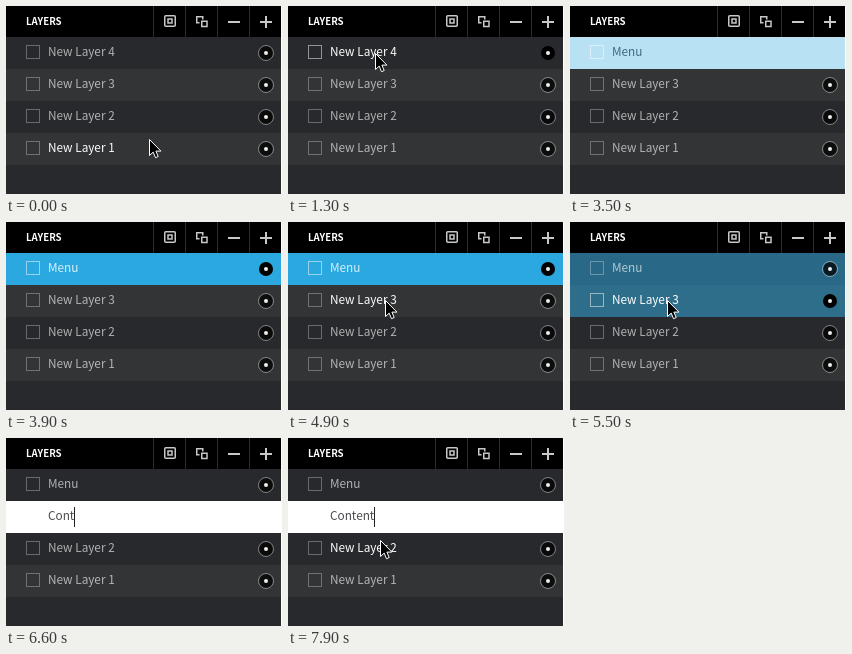
Recreate the animation shown at these times as an HTML page. Size 276 by 188 pixels, loop 8 s.

```html
<!DOCTYPE html>
<html lang="en">
<head>
<meta charset="utf-8">
<title>Layers panel</title>
<style>
  html, body { margin: 0; width: 100%; height: 100%; overflow: hidden; background: #28292d; }
  svg { display: block; width: 276px; height: 188px; }
  text { font: 11.8px "Noto Sans CJK JP", "Noto Sans CJK SC", "Noto Sans CJK", "Noto Sans", sans-serif; white-space: pre; }
  .title { font-size: 9.7px; font-weight: 700; fill: #fff; }
  .icons { fill: none; stroke: #c8c8c8; stroke-width: 1.5; }
</style>
</head>
<body>
<svg viewBox="0 0 276 188">
  <rect width="276" height="188" fill="#28292d"/>
  <g id="rows"></g>
  <rect width="276" height="31"/>
  <path d="M147.5 0V31M179.5 0V31M211.5 0V31M243.5 0V31" stroke="#2b2c2f"/>
  <text class="title" x="20" y="19">LAYERS</text>
  <g class="icons">
    <rect x="158.75" y="9.75" width="10.5" height="10.5" rx="1"/>
    <rect x="162" y="13" width="4" height="4"/>
    <path d="M193.5 16.75H190.75V10.75H196.75V13.5"/>
    <rect x="195.75" y="15.25" width="5.25" height="5.25"/>
    <path d="M222 16H234M254 16H266M260 10V22" stroke-width="2"/>
  </g>
  <rect x="275" width="1" height="188" fill="#fff"/>
  <g id="cursor">
    <path id="arrow" d="M0 0V16L3.7 12.6L6 18.2L8.7 17L6.4 11.6H11.4Z" stroke="#fff"/>
    <path id="hand" d="M-1.6 1Q0 -1 1.5 1V6Q3 4.8 4 6.3Q5.6 5.3 6.5 7Q8.6 6.4 8.6 8.5V11Q8.4 13 7 15.5H-.5Q-1.5 13 -4 9.6Q-4.6 7.2 -1.6 9Z" transform="translate(2 4)" fill="#fff" stroke="#000"/>
  </g>
</svg>
<script>
const LOOP = 8000, TICK = 100, BLINK = 500;
const TOP = 31, ROW = 32, LEFT = 42;
const NS = 'http://www.w3.org/2000/svg';
const $ = id => document.getElementById(id);

function set(node, attrs) {
  for (const key in attrs) node.setAttribute(key, attrs[key]);
}
function add(parent, tag, attrs = {}) {
  const node = document.createElementNS(NS, tag);
  set(node, attrs);
  return parent.appendChild(node);
}
const show = (node, on) => { node.style.display = on ? '' : 'none'; };
const ramp = (time, start, end) => Math.min(1, Math.max(0, (time - start) / (end - start)));
const ease = p => p * p * (3 - 2 * p);
const never = [Infinity, Infinity];

// Fades are [start, end] times; press and typing are moments.
const layers = [
  {
    name: 'New Layer 4', word: 'Menu', press: 1300, release: 5500, typing: 2300,
    select: [1300, 1400], deselect: [5400, 5600], open: [1500, 1800], close: [3400, 3700]
  },
  {
    name: 'New Layer 3', word: 'Content', press: 5500, release: LOOP, typing: 6200,
    select: [5400, 5600], deselect: never, open: [5600, 5900], close: never
  },
  { name: 'New Layer 2' },
  { name: 'New Layer 1' }
];

const glides = [
  { start: 0, end: 600, hide: 2200, from: [143, 133], to: [87, 47] },
  { start: 4500, end: 4900, hide: 6100, from: [87, 48], to: [97, 78] },
  { start: 7700, end: 7900, hide: LOOP, from: [97, 83], to: [92, 102] }
];

function pointerAt(time) {
  const glide = glides.find(g => time >= g.start && time < g.hide);
  if (!glide) return null;
  const p = ease(ramp(time, glide.start, glide.end));
  return glide.from.map((v, i) => Math.round(v + (glide.to[i] - v) * p));
}

// The first key is followed by a short pause, then one key per tick.
function stateAt(layer, time) {
  if (!layer.word) return { text: layer.name, selected: 0, editing: 0 };
  const fade = (rise, fall) => (ramp(time, ...rise) || 0) * (1 - (time < fall[0] ? 0 : ramp(time, ...fall)));
  const { word, typing } = layer;
  const typed = time >= typing;
  const keys = Math.max(1, Math.floor((time - typing) / TICK));
  const lastKey = typing + word.length * TICK;
  return {
    text: typed ? word.slice(0, keys) : layer.name,
    selected: fade(layer.select, layer.deselect),
    editing: fade(layer.open, layer.close),
    active: time >= layer.press && time < layer.release,
    marked: !typed,
    caret: typed && (time < lastKey || Math.floor((time - lastKey) / BLINK) % 2 === 0)
  };
}

const views = layers.map((layer, i) => {
  const g = add($('rows'), 'g', { transform: `translate(0 ${TOP + i * ROW})` });
  const full = { width: 275, height: ROW };
  add(g, 'rect', { ...full, fill: i % 2 ? '#333436' : '#28292d' });
  const blue = add(g, 'rect', { ...full, fill: '#2ba8e0' });
  const box = add(g, 'rect', { x: 20.5, y: 8.5, width: 13, height: 13, fill: 'none', stroke: '#fff' });
  const label = add(g, 'text', { x: LEFT, y: 19, fill: '#fff' });
  const eye = add(g, 'g', { transform: 'translate(260 16)' });
  const disc = add(eye, 'circle', { r: 7 });
  const ring = add(eye, 'circle', { r: 7.5, fill: 'none', stroke: '#fff', opacity: .4 });
  add(eye, 'circle', { r: 2, fill: '#eee' });
  const field = add(g, 'g');
  add(field, 'rect', { ...full, fill: '#fff' });
  const mark = add(field, 'rect', { x: LEFT, y: 6, height: 20, fill: '#b3d7fe' });
  const input = add(field, 'text', { x: LEFT, y: 19, fill: '#484a4d' });
  const caret = add(field, 'rect', { y: 6, width: 1, height: 20, fill: '#222' });
  return { blue, box, label, eye, disc, ring, field, mark, input, caret };
});

function drawRow(view, state, hovered) {
  const { text, selected, editing, active, marked, caret } = state;
  set(view.blue, { opacity: selected });
  set(view.box, { opacity: active ? .5 : .3 });
  view.label.textContent = text;
  set(view.label, { opacity: hovered ? 1 : active ? .82 : .64 });
  set(view.disc, { opacity: active ? 1 : .75 });
  show(view.ring, !active);
  show(view.label, !editing);
  show(view.eye, !editing);
  show(view.field, editing);
  if (!editing) return;

  set(view.field, { opacity: editing });
  view.input.textContent = text;
  const width = view.input.getComputedTextLength();
  set(view.mark, { width: Math.ceil(width) });
  set(view.caret, { x: Math.floor(LEFT + width) });
  show(view.mark, marked);
  show(view.caret, caret);
}

function draw(time) {
  const spot = pointerAt(time);
  const over = spot ? Math.floor((spot[1] - TOP) / ROW) : -1;
  const states = layers.map(layer => stateAt(layer, time));
  states.forEach((state, i) => drawRow(views[i], state, i === over));
  show($('cursor'), spot);
  if (!spot) return;
  const hand = states[over].editing > 0;
  show($('arrow'), !hand);
  show($('hand'), hand);
  set($('cursor'), { transform: `translate(${spot[0] + .5} ${spot[1] + .5})` });
}

const start = performance.now();
function frame() {
  const time = (performance.now() - start) % LOOP;
  draw(Math.floor(time / TICK) * TICK);
  requestAnimationFrame(frame);
}
frame();
</script>
</body>
</html>
```
